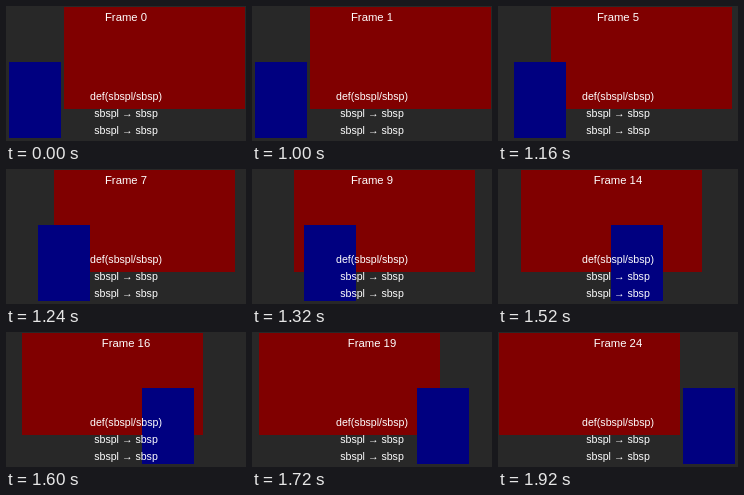
An HTML page for the animation above (2.92 s loop, 240 px wide and 135 px high).

```html
<!DOCTYPE html>
<html lang="en">
<head>
<meta charset="utf-8">
<title>Sliding blocks</title>
<style>
  html, body { margin: 0; width: 100%; height: 100%; overflow: hidden; background: #282828; }
  svg { display: block; width: 100%; height: 100%; }
  text { font: 10.6px "Liberation Sans", Arial, sans-serif; fill: #fff; text-anchor: middle; }
  #label { font-size: 11.3px; }
</style>
</head>
<body>
<svg viewBox="0 0 240 135">
  <rect width="240" height="135" fill="#282828"/>
  <rect id="red" y="1" width="181" height="102" fill="#800000"/>
  <rect id="blue" y="56" width="52" height="76" fill="#000080"/>
  <text id="label" x="120" y="15"></text>
  <text x="120" y="94">def(sbspl/sbsp)</text>
  <text x="120" y="111">sbspl → sbsp</text>
  <text x="120" y="128">sbspl → sbsp</text>
</svg>
<script>
  const LOOP = 2920, HOLD = 1000, STEP = 40, LAST = 24;
  const [red, blue, label] = ["red", "blue", "label"].map(id => document.getElementById(id));

  const slide = (from, to, k) => Math.round(from + (to - from) * k);

  function draw(ms) {
    const t = ms % LOOP;
    const n = t < HOLD ? 0 : Math.min(LAST, 1 + Math.floor((t - HOLD) / STEP));
    const u = Math.max(0, n - 1) / (LAST - 1);
    const k = (1 - Math.cos(Math.PI * u)) / 2;
    red.setAttribute("x", slide(57.5, 0.5, k));
    blue.setAttribute("x", slide(3, 185, k));
    label.textContent = "Frame " + n;
  }

  const start = performance.now();
  function tick() {
    draw(performance.now() - start);
    requestAnimationFrame(tick);
  }
  tick();
</script>
</body>
</html>
```
